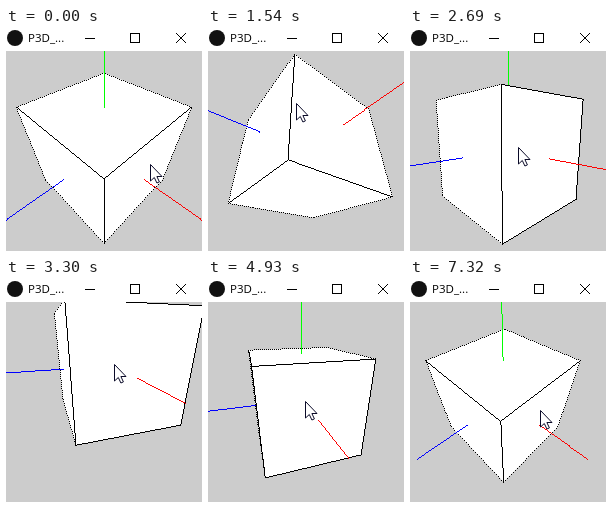
An HTML page with a canvas that plays this animation: 196x223 px, repeating every 7950 ms.

```html
<!DOCTYPE html>
<html lang="en">
<head>
<meta charset="utf-8">
<title>P3D cube</title>
<style>
  html, body { margin: 0; width: 100%; height: 100%; overflow: hidden; background: #ccc; }
  svg, canvas { position: absolute; left: 0; display: block; }
  svg { top: 0; background: #fff; }
  canvas { top: 23px; }
  text { font: 11.5px "Open Sans", "Noto Sans", sans-serif; }
</style>
</head>
<body>
<svg width="196" height="23" viewBox="0 0 196 23">
  <circle cx="9" cy="10" r="8" fill="#111"/>
  <text x="22" y="14">P3D_...</text>
  <g fill="none" stroke="#000">
    <path d="M79 10.5h10"/>
    <rect x="124.5" y="5.5" width="9" height="9"/>
    <path d="M170 5l10 10m0-10l-10 10"/>
  </g>
</svg>
<canvas id="view" width="196" height="200"></canvas>
<script>
const ctx = document.getElementById('view').getContext('2d');
const LOOP = 7950, STEP = 77, FOCAL = 173.2, CX = 98, CY = 100;
const AXIS_COLORS = ['#f00', '#0f0', '#00f'];
const arrow = new Path2D('M0 0V16.5L3.8 13L6.4 18.5L8.9 17.4L6.4 12H11.5Z');

// 0 before a, 1 after b
const ramp = (t, a, b) => Math.min(1, Math.max(0, (t - a) / (b - a)));
// Rises and falls once while p goes from 0 to 1
const bump = p => Math.sin(Math.PI * p);

// Camera and mouse: turn three times, pan three times, zoom out, tilt home
function poseAt(t) {
  const press = ramp(t, 60, 226);
  const under = ramp(t, 310, 919), across = ramp(t, 919, 2151), front = ramp(t, 2151, 2860);
  const up = ramp(t, 2860, 3306), left = ramp(t, 3306, 3922), home = ramp(t, 3922, 4540);
  const zoom = ramp(t, 4540, 4923);
  const tilt = 0.4 * ramp(t, 5250, 5400) + 0.5 * ramp(t, 5500, 6080) + 0.1 * ramp(t, 6240, 6305);
  const leave = ramp(t, 6400, 7300);

  const panX = 0.2 * up - 0.73 * left + 0.44 * home;
  const panY = 0.73 * up - 0.23 * left - 0.45 * home - 0.5 * (bump(up) + bump(home));
  return {
    yaw: 45 + 88 * under - 161 * across + 100 * front - 27 * tilt,
    pitch: 45 - 78 * under + across + 55 * front + 22 * tilt,
    panX, panY,
    dist: 3.5 + 0.38 * zoom,
    mouseX: 144 - 2 * press - 110 * under + 111 * across - 46 * front + 56 * panX
      + 5 * zoom + 33 * leave,
    mouseY: 136 + 27 * press - 103 * under + 29 * across + 40 * front - 60 * panY
      - 4 * zoom + 9 * leave + 16 * bump(leave)
  };
}

// The x, y and z axes as seen by the camera
function basis(yaw, pitch) {
  const rad = Math.PI / 180;
  const sy = Math.sin(yaw * rad), cy = Math.cos(yaw * rad);
  const sp = Math.sin(pitch * rad), cp = Math.cos(pitch * rad);
  return [[cy, -sp * sy, cp * sy], [0, cp, sp], [-sy, -sp * cy, cp * cy]];
}

// Hard pixel line; a gap of 2 leaves out every second pixel
function line([x0, y0], [x1, y1], color, gap = 1) {
  const n = Math.ceil(Math.max(Math.abs(x1 - x0), Math.abs(y1 - y0), 1));
  ctx.fillStyle = color;
  for (let i = 0; i <= n; i += gap) {
    const p = i / n;
    ctx.fillRect(Math.floor(x0 + (x1 - x0) * p), Math.floor(y0 + (y1 - y0) * p), 1, 1);
  }
}

function drawCube({ yaw, pitch, panX, panY, dist }) {
  const axes = basis(yaw, pitch);
  const eye = axes.map(a => dist * a[2] - panX * a[0] - panY * a[1]);

  const project = v => {
    const [x, y, z] = [0, 1, 2].map(k => v.reduce((sum, n, i) => sum + n * axes[i][k], 0));
    const scale = FOCAL / (dist - z);
    return [CX + (x + panX) * scale, CY - (y + panY) * scale];
  };
  const onAxis = (i, n) => project([0, 1, 2].map(k => k === i ? n : 0));
  const drawAxes = front => AXIS_COLORS.forEach((color, i) => {
    if (eye[i] > 1 === front) line(onAxis(i, front ? 1 : 0), onAxis(i, 2), color);
  });

  drawAxes(false);
  const edges = new Map();
  eye.forEach((e, i) => {
    if (Math.abs(e) <= 1) return;
    const corners = [[-1, -1], [1, -1], [1, 1], [-1, 1]].map(([a, b]) => {
      const v = [0, 0, 0];
      v[i] = Math.sign(e);
      v[(i + 1) % 3] = a;
      v[(i + 2) % 3] = b;
      return v;
    });
    ctx.beginPath();
    corners.forEach(v => ctx.lineTo(...project(v)));
    ctx.fillStyle = '#fff';
    ctx.fill();

    // Outlines are half hidden unless their face looks straight at the camera
    const facing = Math.abs(axes[i][2]) > 0.72;
    corners.forEach((v, k) => {
      const pair = [v, corners[(k + 1) % 4]];
      const key = pair.map(String).sort().join('|');
      edges.set(key, { pair, solid: facing || edges.has(key) });
    });
  });
  edges.forEach(({ pair, solid }) => line(...pair.map(project), '#000', solid ? 1 : 2));
  drawAxes(true);
}

function drawMouse({ mouseX, mouseY }) {
  ctx.save();
  ctx.translate(Math.round(mouseX) + 0.5, Math.round(mouseY) - 22.5);
  ctx.fillStyle = '#fff';
  ctx.fill(arrow);
  ctx.strokeStyle = '#0a0a28';
  ctx.stroke(arrow);
  ctx.restore();
}

const start = performance.now();

function frame() {
  const time = (performance.now() - start) % LOOP;
  const pose = poseAt(380 + Math.floor((time - 370) / STEP) * STEP);
  ctx.fillStyle = '#ccc';
  ctx.fillRect(0, 0, 196, 200);
  drawCube(pose);
  drawMouse(pose);
  requestAnimationFrame(frame);
}
frame();
</script>
</body>
</html>
```
